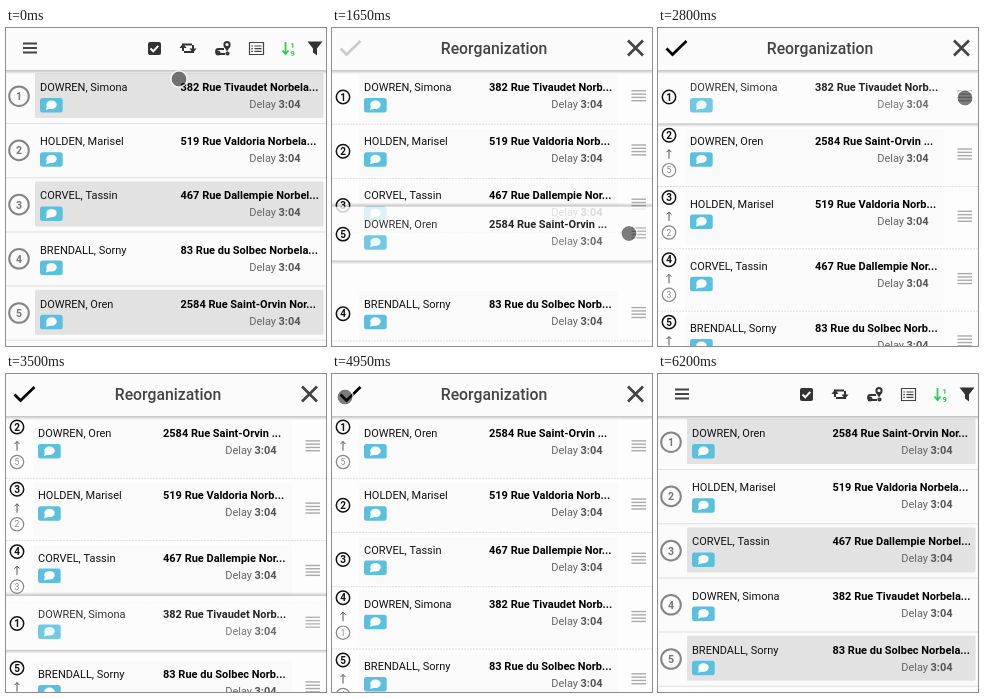
Recreate the animation shown at these times as an HTML page with a canvas. Size 320 px wide and 318 px high, loop 7.6 s.

```html
<!DOCTYPE html>
<html lang="en">
<head>
<meta charset="utf-8">
<title>Stop reorganization</title>
<style>
html, body { margin: 0; width: 100%; height: 100%; overflow: hidden; background: #fbfbfb; }
canvas { display: block; width: 320px; height: 318px; }
</style>
</head>
<body>
<canvas id="stage"></canvas>
<script>
const LOOP = 7600, W = 320, H = 318, TOP = 43.5, ROW = 54.2, TALL = 62.3;
const FONT = 'Roboto, sans-serif';
const canvas = document.getElementById('stage');
const scale = window.devicePixelRatio || 1;
canvas.width = W * scale;
canvas.height = H * scale;
const ctx = canvas.getContext('2d');

const stops = [
  { name: 'DOWREN, Simona', street: '382 Rue Tivaudet Norbela...', short: '382 Rue Tivaudet Norb...' },
  { name: 'HOLDEN, Marisel', street: '519 Rue Valdoria Norbela...', short: '519 Rue Valdoria Norb...' },
  { name: 'CORVEL, Tassin', street: '467 Rue Dallempie Norbel...', short: '467 Rue Dallempie Nor...' },
  { name: 'BRENDALL, Sorny', street: '83 Rue du Solbec Norbela...', short: '83 Rue du Solbec Norb...' },
  { name: 'DOWREN, Oren', street: '2584 Rue Saint-Orvin Nor...', short: '2584 Rue Saint-Orvin ...' }
];
const orders = [[0, 1, 2, 3, 4], [0, 4, 1, 2, 3], [4, 1, 2, 0, 3]];
const drags = [
  { who: 4, lift: 1100, start: 1400, drop: 2200, to: 102 },
  { who: 0, lift: 2800, start: 2800, drop: 3900, to: 224 }
];
// time, x, y, opacity
const pointerPath = [
  [0, 173, 51, 1], [250, 217, 20, 1], [600, 217, 20, 1], [950, 305, 285, 1],
  [1400, 305, 285, 1], [1900, 289, 127, 1], [2150, 289, 127, 0], [2350, 289, 127, 0],
  [2600, 307, 70, 1], [2800, 307, 70, 1], [3300, 300, 249, 1], [3500, 300, 249, 0],
  [4200, 300, 249, 0], [4600, 13, 23, 1], [5700, 13, 23, 1], [5900, 13, 23, 0], [LOOP, 13, 23, 0]
];

const clamp = v => Math.min(1, Math.max(0, v));
const ease = v => (1 - Math.cos(Math.PI * clamp(v))) / 2;
const ramp = (t, from, to) => ease((t - from) / (to - from));
const mix = (a, b, p) => a + (b - a) * p;

function box(x, y, w, h, color, radius = 0) {
  ctx.fillStyle = color;
  ctx.beginPath();
  ctx.roundRect(x, y, w, h, radius);
  ctx.fill();
}

function stroke(path, color, width = 2) {
  ctx.strokeStyle = color;
  ctx.lineWidth = width;
  ctx.stroke(new Path2D(path));
}

function fill(path, color) {
  ctx.fillStyle = color;
  ctx.fill(new Path2D(path));
}

function ring(x, y, r, color, width) {
  ctx.strokeStyle = color;
  ctx.lineWidth = width;
  ctx.beginPath();
  ctx.arc(x, y, r, 0, 2 * Math.PI);
  ctx.stroke();
}

function text(str, x, y, style, color, align = 'left') {
  ctx.font = `${style} ${FONT}`;
  ctx.fillStyle = color;
  ctx.textAlign = align;
  ctx.fillText(str, x, y);
}

function shadow(y, size) {
  const g = ctx.createLinearGradient(0, y, 0, y + size);
  g.addColorStop(0, 'rgba(0,0,0,.24)');
  g.addColorStop(1, 'rgba(0,0,0,0)');
  ctx.fillStyle = g;
  ctx.fillRect(0, Math.min(y, y + size), W, Math.abs(size));
}

function header() {
  box(0, 0, W, 42, '#fbfbfb');
  shadow(42, 4);
}

function stopDetails(stop, street, x, streetX, delayX, y) {
  text(stop.name, x, y + 19.5, '11px', '#111');
  text(street, streetX, y + 19.5, 'bold 11px', '#000');
  text('3:04', delayX - 0.5, y + 36.5, 'bold 11px', '#555', 'right');
  text('Delay', delayX - 25, y + 36.5, '11px', '#666', 'right');
  box(x, y + 26.5, 22.7, 14.5, '#5bc0de', 2.5);
  ctx.fillStyle = '#fff';
  ctx.beginPath();
  ctx.ellipse(x + 11.5, y + 33.2, 5.2, 4.2, 0, 0, 2 * Math.PI);
  ctx.fill();
  fill(`M${x + 7} ${y + 34}l-1 4.5 5-1.5z`, '#fff');
}

function listIcons() {
  const dark = '#333';
  stroke('M17 15.5H31M17 20H31M17 24.5H31', '#444', 1.8);
  box(142, 14, 13, 13, dark, 2);
  stroke('M144.5 20.5l2.8 2.8 5-5.4', '#fff', 2);
  stroke('M177 23V16.5H186M187 17V24H178', dark);
  fill('M173.5 20l3.5-4.5 3.5 4.5zM183.5 20.5l3.5 4.5 3.5-4.5z', dark);
  stroke('M219 26H212.5a2.4 2.4 0 0 1 0-5H218', dark, 1.8);
  ring(221, 16.5, 2.6, dark, 2);
  fill('M217.5 18h7l-3.5 5.5z', dark);
  ring(212, 25, 1.5, dark, 2);
  ring(221.5, 25.5, 1.2, dark, 1.8);
  stroke('M243.5 14.5h14v12h-14zM248.5 18h7M248.5 20.7h7M248.5 23.4h7', '#444', 1.2);
  stroke('M245.3 18h1.6M245.3 20.7h1.6M245.3 23.4h1.6', '#444', 1.2);
  stroke('M279.5 14V25M276.5 22.5l3 3.5 3-3.5', '#2fcb5a', 1.8);
  text('1', 286.5, 19.5, 'bold 8px', '#2fcb5a', 'center');
  text('9', 286.5, 27.5, 'bold 8px', '#2fcb5a', 'center');
  fill('M301.5 13.5H316.5L311 20.5V27.5L307 24.5V20.5z', dark);
}

function drawList(order) {
  box(0, 0, W, H, '#fbfbfb');
  order.forEach((id, i) => {
    const y = TOP + i * ROW;
    if (i % 2 === 0) box(29, y + 1.5, 288.5, 45, '#e2e2e2', 1);
    box(0, y + 51.5, W, 1, '#e0e0e0');
    ring(13, y + 24.7, 9.8, '#858585', 2);
    text(i + 1, 13, y + 28.6, 'bold 10.5px', '#777', 'center');
    stopDetails(stops[id], stops[id].street, 34, 174.5, 295, y);
  });
  header();
  listIcons();
}

function drawRow(id, place, y, h, lifted) {
  ctx.save();
  const opacity = ctx.globalAlpha;
  if (lifted) {
    shadow(y - 2, -4);
    shadow(y + h - 2.5, 4);
    ctx.globalAlpha = opacity * 0.8;
    box(0, y - 2, W, h - 0.5, '#fdfdfd');
    ctx.globalAlpha = opacity * 0.85;
  } else {
    box(0, y, W, h, '#fdfdfd');
    box(27, y + 3, 259, h - 7, '#fafafa');
    ctx.setLineDash([2, 1]);
    stroke(`M0 ${y + h - 1.5}H${W}`, '#dedede', 1);
    ctx.setLineDash([]);
  }
  stopDetails(stops[id], stops[id].short, 32, 157, 271, y);
  for (let k = 0; k < 4; k++) {
    box(299.5, y + h / 2 - 8.5 + k * 3.3, 14.5, 1.4, '#aaa');
  }
  ctx.globalAlpha = opacity;
  const moved = id !== place;
  const numberY = y + (moved ? 9.5 : 25.5);
  ring(11, numberY, 6.7, '#111', 1.5);
  text(place + 1, 11, numberY + 3.5, 'bold 10px', '#111', 'center');
  if (moved) {
    stroke(`M11 ${y + 33}v-9m-2.5 2.5l2.5-2.5 2.5 2.5`, '#555', 1);
    ring(11, y + 44.5, 6.7, '#888', 1.2);
    text(id + 1, 11, y + 47.5, '8.5px', '#888', 'center');
  }
  ctx.restore();
}

function drawReorganization(t) {
  box(0, 0, W, H, '#fdfdfd');
  const step = drags.filter(d => t >= d.drop).length;
  const drag = drags[step];
  let y = TOP;
  const rows = orders[step].map((id, place) => {
    const row = { id, place, y, h: id === place ? ROW : TALL };
    y += row.h;
    return row;
  });
  const held = drag && t >= drag.lift && rows.find(r => r.id === drag.who);
  if (held) {
    const from = held.y;
    held.y = mix(from, drag.to, ramp(t, drag.start, drag.start + 500));
    const dir = Math.sign(drag.to - from);
    for (const row of rows) {
      if ((row.y - from) * dir <= 0 || row === held) continue;
      const past = (held.y + held.h / 2 - row.y - row.h / 2) * dir;
      row.y -= dir * held.h * ease((past + 24) / 20);
    }
  }
  for (const r of rows) if (r !== held) drawRow(r.id, r.place, r.y, r.h, false);
  if (held) drawRow(held.id, held.place, held.y, held.h, true);
  header();
  text('Reorganization', 162, 26, '500 15.75px', '#444', 'center');
  stroke('M8.5 20.5L14.5 26.5L28.5 13', step ? '#000' : '#ccc', 2.7);
  stroke('M296 12.5L311 27.5M311 12.5L296 27.5', '#444', 2.7);
}

function drawLoading(t, alpha) {
  ctx.save();
  ctx.globalAlpha = alpha;
  box(0, 0, W, H, 'rgba(0,0,0,.5)');
  ctx.shadowColor = 'rgba(0,0,0,.4)';
  ctx.shadowBlur = 3 * scale;
  box(130.5, 254.5, 60, 62.5, '#fafafa', 2);
  ctx.shadowColor = 'transparent';
  const start = -1.5 + (t - 5550) / 1000 * 2 * Math.PI;
  ctx.strokeStyle = '#4a8fe7';
  ctx.lineWidth = 1.5;
  ctx.beginPath();
  ctx.arc(161, 285, 9.5, start, start + 1.6);
  ctx.stroke();
  ctx.restore();
}

function drawPointer(t) {
  const i = pointerPath.findIndex(key => key[0] > t);
  const a = pointerPath[i - 1], b = pointerPath[i];
  const p = ramp(t, a[0], b[0]);
  const [x, y, alpha] = [1, 2, 3].map(k => mix(a[k], b[k], p));
  ctx.save();
  ctx.globalAlpha = alpha;
  ctx.fillStyle = 'rgba(20,20,20,.55)';
  ctx.beginPath();
  ctx.arc(x, y, 7.5, 0, 2 * Math.PI);
  ctx.fill();
  ring(x, y, 8.2, 'rgba(255,255,255,.7)', 1.4);
  ctx.restore();
}

function draw(t) {
  ctx.setTransform(scale, 0, 0, scale, 0, 0);
  drawList(orders[t < 4900 ? 0 : 2]);
  const shown = ramp(t, 500, 850) * (1 - ramp(t, 5700, 6000));
  if (shown > 0) {
    ctx.save();
    ctx.globalAlpha = shown;
    ctx.translate(0, 40 * (1 - shown));
    drawReorganization(t);
    ctx.restore();
  }
  const loading = ramp(t, 5050, 5300) * (1 - ramp(t, 5650, 5850));
  if (loading > 0) drawLoading(t, loading);
  drawPointer(t);
}

function tick() {
  draw(performance.now() % LOOP);
  requestAnimationFrame(tick);
}
tick();
</script>
</body>
</html>
```
